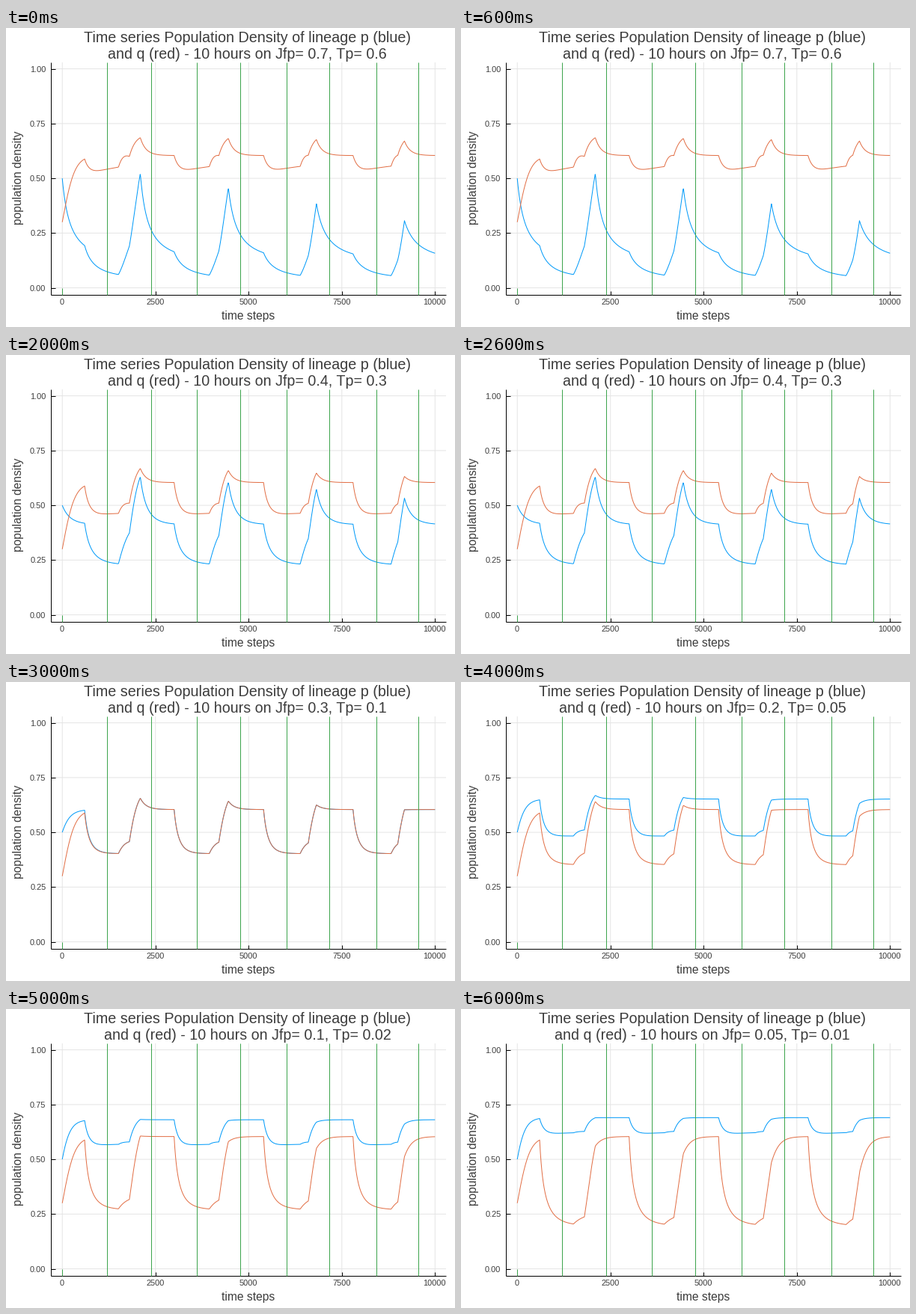
Write a matplotlib script that moves like this. It is 600x400 px and loops after 7000 ms.

```python
import numpy as np
import matplotlib.pyplot as plt
from matplotlib.animation import FuncAnimation

W, H, DPI = 600, 400, 100
PX = 72 / DPI                       # one pixel in points
LEFT, RIGHT, TOP, BOTTOM = 60.2, 588, 46, 356.6
INK = "#3c3c3c"
BLUE, RED, GREEN, GRID = "#009af9", "#e26f46", "#3da44d", "#e5e5e5"

STEPS, DT = 10000, 0.01
CAPACITY, COST = 0.7, 0.96
JQ, TQ = 0.3, 0.1                   # traits of lineage q
TRAITS = [("0.7", "0.6"), ("0.6", "0.5"), ("0.4", "0.3"), ("0.3", "0.1"),
          ("0.2", "0.05"), ("0.1", "0.02"), ("0.05", "0.01")]
MARKERS = [135, 194, 255, 313, 375, 432, 495, 551]


def to_x(step):
    return 75.2 + step * 0.04981


def to_y(density):
    return 347.6 - density * 293


def relieved(n):
    """Cost-free windows, one per cycle, each narrower than the last."""
    k = n // 2400
    half = 294 - 38 * k
    return abs(n - 1800 - 2400 * k) < half if k < 4 else False


def simulate(jp, tp):
    """Densities of both lineages under alternating competition and cost."""
    p, q = 0.5, 0.3
    path = np.empty((STEPS + 1, 2))
    path[0] = p, q
    for n in range(STEPS):
        compete = n >= 600 and (n - 600) % 2400 < 1200
        cost = 0 if relieved(n) else COST
        m = p * q / (jp * p + JQ * q) if compete else 0
        dp = p * (CAPACITY - p - cost * tp - jp * m)
        dq = q * (CAPACITY - q - cost * TQ - JQ * m)
        p, q = p + DT * dp, q + DT * dq
        path[n + 1] = p, q
    return path


fig = plt.figure(figsize=(W / DPI, H / DPI), dpi=DPI, facecolor="white")
ax = fig.add_axes([0, 0, 1, 1])
ax.set_xlim(0, W)
ax.set_ylim(H, 0)
ax.axis("off")


def stroke(x, y, color, z, **kw):
    return ax.plot(x, y, color=color, lw=PX, zorder=z,
                   solid_capstyle="butt", solid_joinstyle="round", **kw)[0]


def label(x, y, text, size, ha="center", va="baseline", **kw):
    return ax.text(x, y, text, fontsize=size * PX, color=INK, ha=ha,
                   va=va, family="Liberation Sans", **kw)


for k in range(5):
    gx, gy = to_x(2500 * k), to_y(0.25 * k)
    stroke([gx, gx], [TOP, BOTTOM], GRID, 1, snap=False)
    stroke([LEFT, RIGHT], [gy, gy], GRID, 1, snap=False)
    stroke([gx, gx], [BOTTOM - 5, BOTTOM], "black", 2)
    stroke([LEFT, LEFT + 6], [gy, gy], "black", 2)
    label(gx - 0.5, 370.3, str(2500 * k), 11)
    label(53.5, gy + 4, f"{0.25 * k:.2f}", 11, ha="right")

stroke([LEFT, RIGHT], [BOTTOM, BOTTOM], "black", 2)
stroke([LEFT, LEFT], [TOP, BOTTOM], "black", 2)

stroke([75, 75], [348, BOTTOM], GREEN, 5)
for mx in MARKERS:
    stroke([mx, mx], [TOP, BOTTOM], GREEN, 5)

label(322.6, 19.3, "Time series Population Density of lineage p (blue)", 19.8)
subtitle = label(322.6, 41, "", 19.7)
label(323.7, 390, "time steps", 15.6)
label(24.5, 200.5, "population density", 15.5, ha="right", va="center",
      rotation=90)

xs = to_x(np.arange(STEPS + 1))
blue = stroke([], [], BLUE, 4)
red = stroke([], [], RED, 4)
PATHS = [simulate(float(j), float(t)) for j, t in TRAITS]


def draw(i):
    jp, tp = TRAITS[i]
    subtitle.set_text(f"and q (red) - 10 hours on Jfp= {jp}, Tp= {tp}")
    blue.set_data(xs[::10], to_y(PATHS[i][::10, 0]))
    red.set_data(xs[::10], to_y(PATHS[i][::10, 1]))
    return blue, red, subtitle


anim = FuncAnimation(fig, draw, frames=len(TRAITS), interval=1000,
                     repeat=True, repeat_delay=0)
plt.show()
```
